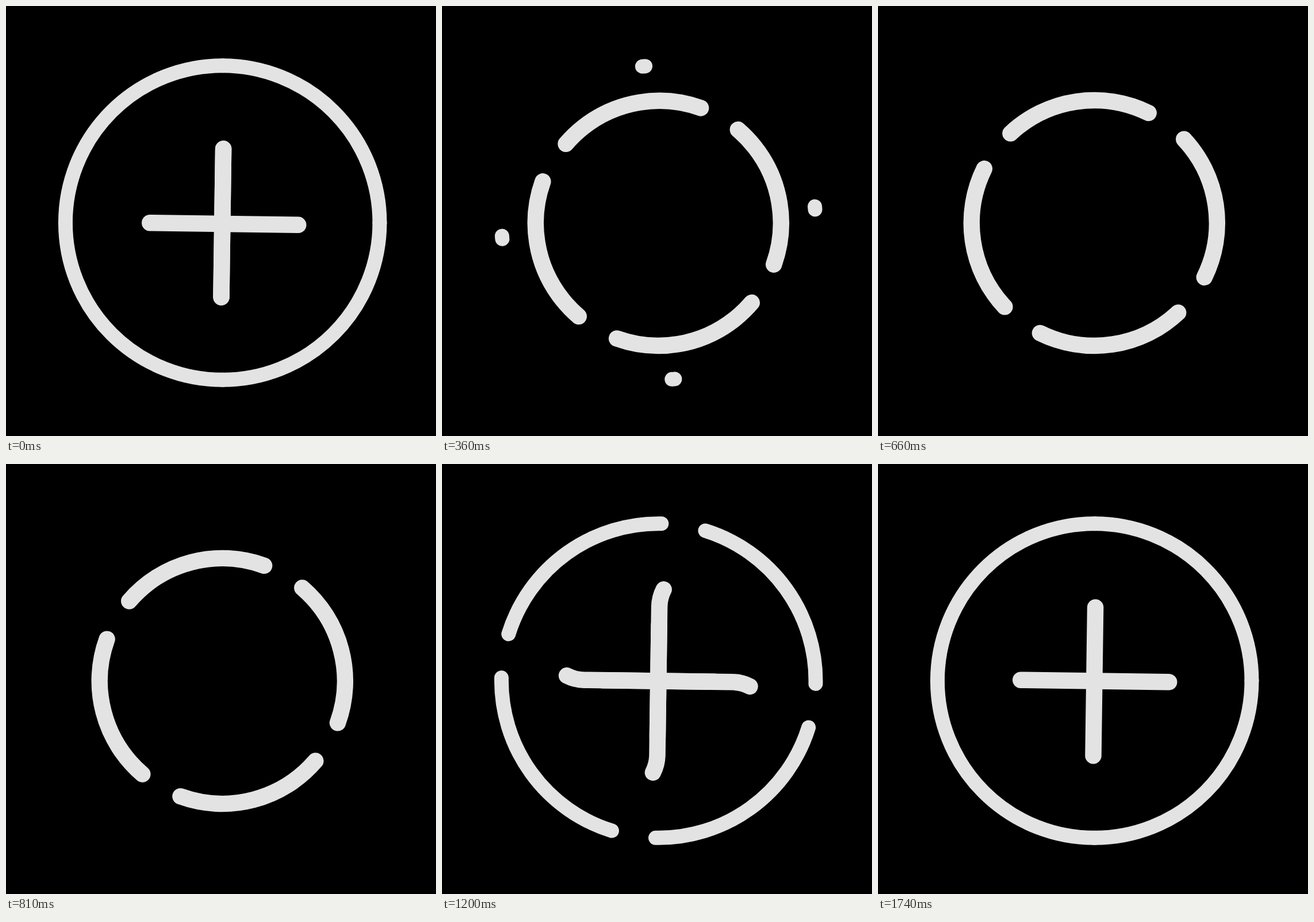
Animation, 748 px wide and 748 px high, one loop 2860 ms. Source, as an HTML page:

```html
<!DOCTYPE html>
<html lang="en">
<head>
<meta charset="utf-8">
<title>Plus loader</title>
<style>
  html, body { margin: 0; width: 100%; height: 100%; overflow: hidden; background: #000; }
  svg { display: block; width: 100vw; height: 100vh; }
  path { fill: none; stroke: #e3e3e3; stroke-linecap: round; }
</style>
</head>
<body>
<svg viewBox="0 0 748 748">
  <g id="ring" transform="translate(376.7 377)" stroke-width="25"></g>
  <g id="bars" transform="translate(376.3 377.5) rotate(.8)" stroke-width="28.5"></g>
</svg>
<script>
const LOOP = 2860, STEP = 30, END = 1740;

// Bars: half length H, orbit radius R, fillet radius r tangent to both
const H = 129, R = 213.5, r = (R * R - H * H) / (2 * R);
const a = Math.asin(r / (R - r));
const tx = R * Math.sin(a), ty = R * Math.cos(a);
const TRIP = 2 * r * (Math.PI / 2 + a) + R * 2 * (Math.PI - a) + 2 * H;
const TRACK = `M0 ${H}V${-H}A${r} ${r} 0 0 0 ${-tx} ${-ty}` +
  `A${R} ${R} 0 1 0 ${tx} ${-ty}A${r} ${r} 0 0 0 0 ${-H}` +
  `V${H}A${r} ${r} 0 0 0 ${tx} ${ty}`;

// Travel along the track: time, distance, speed
const KEYS = [
  [0, 0, 0], [210, 204.5, 1.95], [540, 850, .32], [675, 871, .1], [810, 893, .32],
  [1050, TRIP - 264, 2.2], [1300, TRIP + 12, 0], [1350, TRIP + 11, -.035],
  [1620, TRIP + .8, -.01], [END, TRIP, 0]
];

// Ring: radius, sway of the dashes in degrees, duration of each change
const RING = 273.3, SWAY = 6, SPAN = 387, GROW = 921;

const clamp = x => Math.min(1, Math.max(0, x));
const ease = x => (1 - Math.cos(Math.PI * clamp(x))) / 2;

function travel(t) {
  let i = 1;
  while (i < KEYS.length - 1 && t > KEYS[i][0]) i++;
  const [t0, d0, v0] = KEYS[i - 1], [t1, d1, v1] = KEYS[i];
  const h = t1 - t0, u = (t - t0) / h, w = 1 - u;
  return d0 * w * w * (1 + 2 * u) + d1 * u * u * (1 + 2 * w) +
    h * u * w * (v0 * w - v1 * u);
}

function addPaths(id) {
  return [0, 90, 180, 270].map(angle => {
    const p = document.createElementNS("http://www.w3.org/2000/svg", "path");
    p.setAttribute("transform", `rotate(${angle})`);
    return document.getElementById(id).appendChild(p);
  });
}

const dashes = addPaths("ring"), bars = addPaths("bars");
for (const b of bars) {
  b.setAttribute("d", TRACK);
  b.setAttribute("stroke-dasharray", `${2 * H} 5000`);
}

const show = (el, on) => el.setAttribute("visibility", on ? "visible" : "hidden");

function point(deg) {
  const q = deg * Math.PI / 180;
  return `${RING * Math.sin(q)} ${-RING * Math.cos(q)}`;
}

function drawRing(t) {
  const grow = t >= GROW, p = ease((grow ? t - GROW : t) / SPAN);
  const from = grow ? SWAY - (90 + SWAY) * p : -SWAY * p;
  const to = grow ? SWAY * (1 - p) : 90 - (90 + SWAY) * p;
  for (const el of dashes) {
    show(el, to - from > .05);
    el.setAttribute("d", `M${point(from)}A${RING} ${RING} 0 0 1 ${point(to)}`);
  }
}

function drawBars(t) {
  const d = travel(t), home = t > 1050 && d >= TRIP;
  bars.forEach((el, i) => {
    el.setAttribute("stroke-dashoffset", -d);
    // Opposite bars merge into one when they meet
    show(el, i === 0 || (i === 3 ? t > 0 : !home));
  });
  // The right bar leaves from slightly off centre
  const off = 1 - ease((t - 210) / 330);
  bars[1].setAttribute("transform", `translate(${3 * off} ${1.5 * off}) rotate(90)`);
}

function draw(ms) {
  const t = Math.min(END, Math.floor((ms % LOOP + .5) / STEP) * STEP);
  drawRing(t);
  drawBars(t);
}

const start = performance.now();
function tick() {
  draw(performance.now() - start);
  requestAnimationFrame(tick);
}
tick();
</script>
</body>
</html>
```
